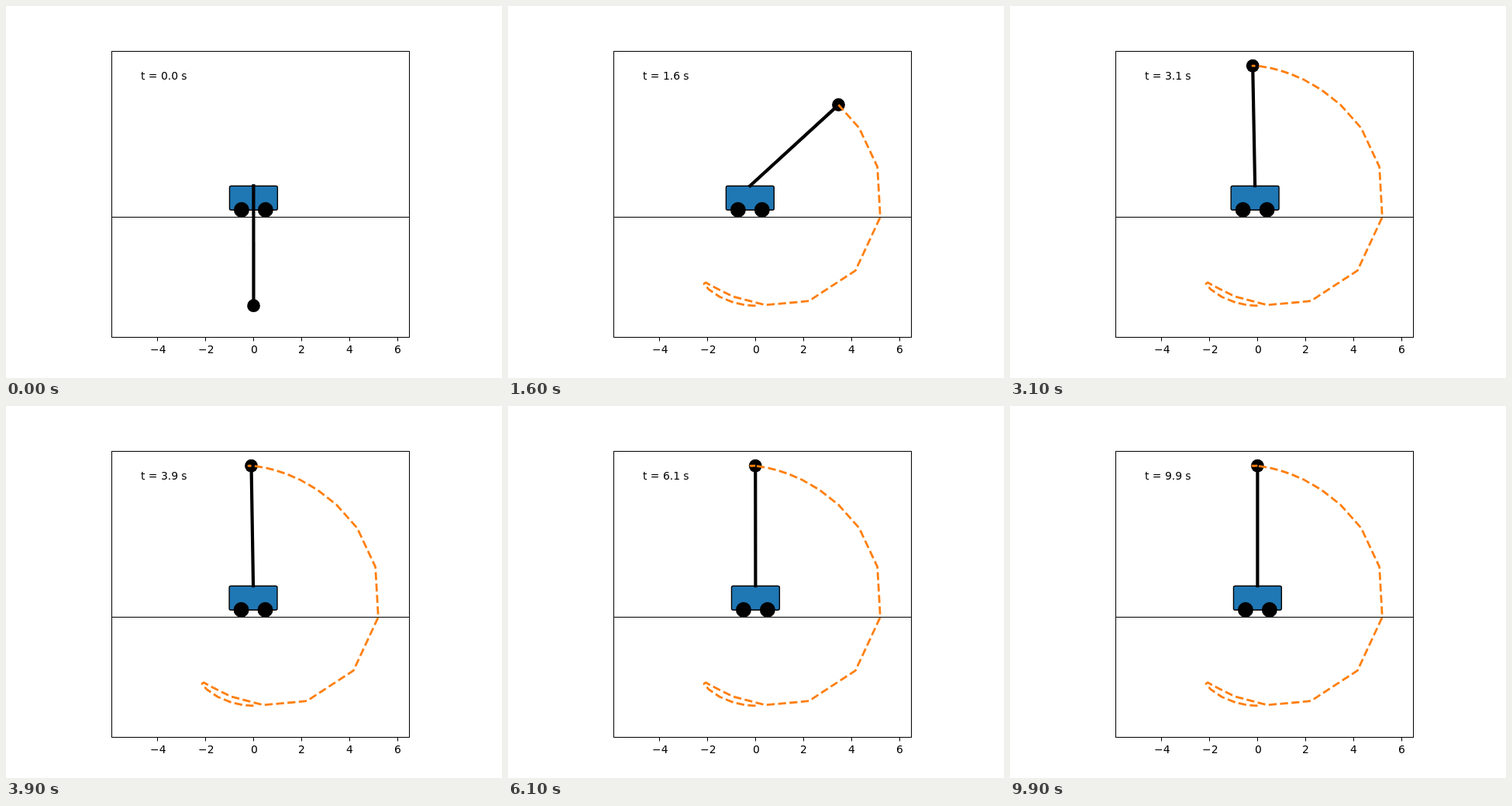
These frames come from a looping animation (640x480 px, 10000 ms). An HTML page with a canvas:

```html
<!DOCTYPE html>
<html lang="en">
<head>
<meta charset="utf-8">
<title>Cart-pole swing-up</title>
<style>
  html, body { margin: 0; width: 100%; height: 100%; overflow: hidden; background: #fff; }
  canvas { display: block; }
</style>
</head>
<body>
<canvas id="stage" width="640" height="480"></canvas>
<script>
const ctx = document.getElementById('stage').getContext('2d');
const UNIT = 30.95, ORIGIN = 319.4, GROUND = 272.2;
const PIVOT = GROUND - 1.3 * UNIT, ROD = 5 * UNIT, POINT = 100 / 72;
const STEP = 100, STEPS = 100;
const CATCH = 1.5;  // seconds of swing-up before balancing begins

// Swing-up keys, 0.2 s apart from -0.3 s: cart offset in px, rod angle in degrees
const cartKeys = [0, 0, 0.8, 7.1, 17.6, 27.1, 30.2, 26.1, 11.6, -1.9, -9.7];
const angleKeys = [0, 0, -1.4, -13.2, -30.4, -36.2, -22.6, 16, 74.8, 119, 143.4];

// Catmull-Rom curve through evenly spaced keys
function curve(keys, t) {
  const place = (t + 0.3) / 0.2, i = Math.floor(place), u = place - i;
  const [a, b, c, d] = keys.slice(i - 1, i + 3);
  return b + u / 2 * (c - a + u * (2 * a - 5 * b + 4 * c - d + u * (3 * (b - c) + d - a)));
}

// Balancing: cart and rod settle with damped motion
const settleCart = t =>
  -Math.exp(-1.8 * t) * (1.9 * Math.cos(1.1 * t) + 60 * Math.sin(1.1 * t));
const settleAngle = t => 180 - Math.exp(-1.7 * t) * (61.2 - 48.5 * t);

function poseAt(t) {
  const swinging = t < CATCH;
  const cart = ORIGIN + (swinging ? curve(cartKeys, t) : settleCart(t - CATCH));
  const degrees = swinging ? curve(angleKeys, t) : settleAngle(t - CATCH);
  const angle = degrees * Math.PI / 180;
  return { cart, bob: [cart + ROD * Math.sin(angle), PIVOT + ROD * Math.cos(angle)] };
}

const poses = Array.from({ length: STEPS }, (_, i) => poseAt(i / 10));

function line(points, width, color = '#000', cap = 'butt') {
  ctx.beginPath();
  points.forEach(([x, y]) => ctx.lineTo(x, y));
  ctx.lineWidth = width;
  ctx.strokeStyle = color;
  ctx.lineCap = cap;
  ctx.stroke();
}

function disc(x, y, r) {
  ctx.beginPath();
  ctx.arc(x, y, r, 0, 2 * Math.PI);
  ctx.fillStyle = '#000';
  ctx.fill();
}

function drawAxes(step) {
  ctx.fillStyle = '#fff';
  ctx.fillRect(0, 0, 640, 480);
  ctx.strokeStyle = ctx.fillStyle = '#000';
  ctx.lineWidth = 1;
  ctx.strokeRect(136.5, 58.5, 384, 369);
  ctx.font = '13.89px "DejaVu Sans", sans-serif';
  for (let v = -4; v <= 6; v += 2) {
    const x = ORIGIN + v * UNIT, tick = Math.floor(x) + 0.5;
    const label = String(v).replace('-', '\u2212');
    line([[tick, 428], [tick, 432.5]], 1);
    ctx.fillText(label, Math.round(x + 0.57 - ctx.measureText(label).width / 2), 448);
  }
  ctx.fillText(`t = ${(step / 10).toFixed(1)} s`, 174, 95);
}

function drawCart(x) {
  ctx.beginPath();
  ctx.roundRect(x - UNIT, PIVOT + 0.3, 2 * UNIT, UNIT, 2);
  ctx.fillStyle = '#1f77b4';
  ctx.fill();
  ctx.strokeStyle = '#000';
  ctx.lineWidth = POINT;
  ctx.stroke();
  for (const side of [-0.5, 0.5]) disc(x + side * UNIT, 263, 10);
}

function drawTrail(step) {
  const width = 2 * POINT;
  ctx.lineJoin = 'round';
  ctx.setLineDash([3.7 * width, 1.6 * width]);
  line(poses.slice(0, step + 1).map(pose => pose.bob), width, '#ff7f0e');
  ctx.setLineDash([]);
  ctx.lineJoin = 'miter';
}

function draw(now) {
  const step = Math.floor(now / STEP) % STEPS;
  const { cart, bob } = poses[step];
  drawAxes(step);
  drawCart(cart);
  line([[136, 272.5], [521, 272.5]], 1.1);
  line([[cart, PIVOT], bob], 3 * POINT, '#000', 'square');
  disc(...bob, 8.4);
  if (step) drawTrail(step);
}

let start;
function tick(now) {
  start ??= now;
  draw(now - start);
  requestAnimationFrame(tick);
}
draw(0);
requestAnimationFrame(tick);
</script>
</body>
</html>
```
